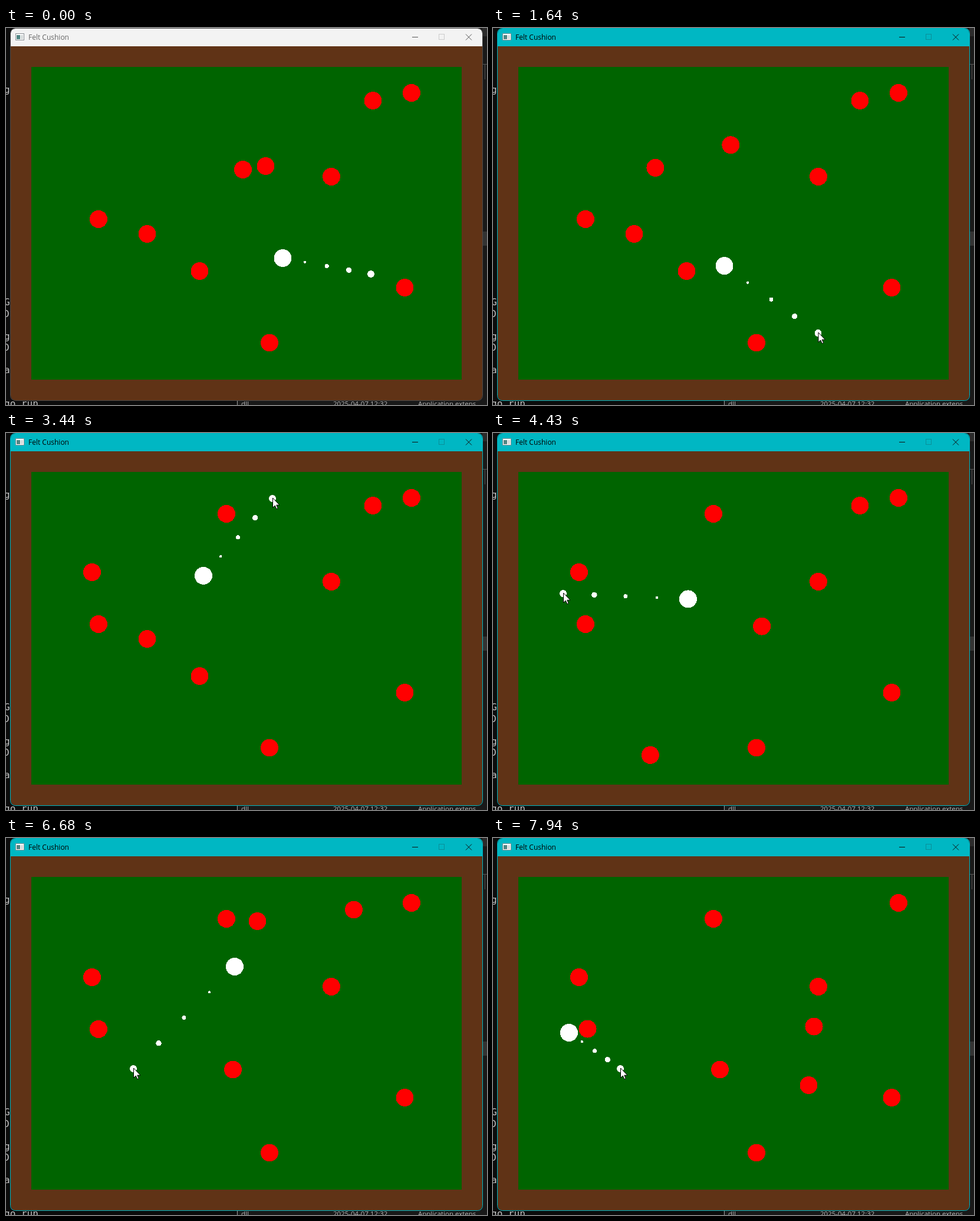
Animation of 816x639 px, one loop 8 s. Source, as an HTML page:

```html
<!DOCTYPE html>
<html lang="en">
<head>
<meta charset="utf-8">
<title>Felt Cushion</title>
<style>
  html, body { margin: 0; width: 100%; height: 100%; overflow: hidden; background: #0c0c0c; }
  svg { display: block; width: 816px; height: 639px; }
  .term { font: 16px "DejaVu Sans Mono", monospace; fill: #c4c4c4; }
  .list { font: 11.5px "Open Sans", sans-serif; fill: #b8b8b8; }
  .title { font: 12px "Open Sans", sans-serif; fill: #666; }
  .bar { fill: #f3f3f3; }
  .edge { fill: none; stroke: #4a4a4a; }
  .btn { fill: none; stroke: #555; }
  .off { fill: none; stroke: #ccc; }
  .active .title { fill: #000; }
  .active .bar { fill: #00b7c3; }
  .active .edge { stroke: #00b7c3; }
  .active .btn { stroke: #111; }
  .active .off { stroke: #0a8f99; }
  #cursor { visibility: hidden; }
  .active #cursor { visibility: visible; }
  #balls { shape-rendering: crispEdges; }
</style>
</head>
<body>
<svg id="stage" viewBox="0 0 816 639">
  <rect width="816" height="639" fill="#0c0c0c"/>
  <rect x="391" width="425" height="639" fill="#191919"/>
  <rect x="808" width="8" height="14" fill="#2b2b2b"/>
  <rect x="808" y="345" width="8" height="24" fill="#333"/>
  <path d="M808 61.5h8M812.5 62v25" stroke="#555"/>
  <path d="M392.5 631v8" stroke="#999"/>
  <g class="term">
    <text x="-3" y="110">g</text>
    <text x="-3" y="470">G</text>
    <text x="-4" y="490">D</text>
    <text x="-3" y="528">g</text>
    <text x="-4" y="547">D</text>
    <text x="-3" y="585">a</text>
    <text x="-3" y="642">go run</text>
  </g>
  <g class="list">
    <text x="396" y="641">.dll</text>
    <text x="555" y="641">2025-04-07 12:32</text>
    <text x="699" y="641">Application extens</text>
  </g>

  <rect class="bar" x="8" y="1" width="800" height="60" rx="8"/>
  <path d="M8 31h800v592a8 8 0 0 1-8 8H16a8 8 0 0 1-8-8z" fill="#603316"/>
  <rect class="edge" x="7.5" y=".5" width="801" height="631" rx="8"/>
  <rect x="43" y="66" width="730" height="530" fill="#006400"/>
  <rect x="16.5" y="9.5" width="14" height="11" fill="#fff" stroke="#8a8f94"/>
  <rect x="18" y="12" width="6" height="7" fill="#4f8583"/>
  <rect x="25" y="12" width="4" height="7" fill="#d5dada"/>
  <text class="title" x="38" y="20">Felt Cushion</text>
  <path class="btn" d="M689 15.5h10M780 10.5l10 10M790 10.5l-10 10"/>
  <rect class="off" x="734.5" y="10.5" width="9" height="9"/>

  <g id="balls"></g>
  <path id="cursor" d="M.5 0V16.5L4.3 13 6.8 18.7 9.2 17.6 6.8 12.1H12z" fill="#fff" stroke="#000"/>
</svg>
<script>
const LOOP = 8000, START = 560, STEP = 90;
const LEFT = 58, RIGHT = 758, TOP = 81, BOTTOM = 581;

// Reflects a straight course back between two cushions.
function fold(v, lo, hi) {
  const w = hi - lo, m = (((v - lo) % (2 * w)) + 2 * w) % (2 * w);
  return lo + Math.min(m, 2 * w - m);
}

// A run of straight rolls. Targets beyond a cushion mean a bounce.
class Course {
  constructor(x, y) {
    this.x = x;
    this.y = y;
    this.end = 0;
    this.legs = [];
  }
  wait(t) {
    this.end = t;
    return this;
  }
  // k: final speed over first speed
  to(t, x, y, k = 1) {
    this.legs.push({ a: this.end, b: t, k, x: this.x, y: this.y, dx: x - this.x, dy: y - this.y });
    this.x = fold(x, LEFT, RIGHT);
    this.y = fold(y, TOP, BOTTOM);
    this.end = t;
    return this;
  }
  at(t) {
    const leg = this.legs.findLast(l => t >= l.a) || this.legs[0];
    if (!leg) return [this.x, this.y];
    const u = Math.min(1, Math.max(0, (t - leg.a) / (leg.b - leg.a)));
    const p = u * (2 - (1 - leg.k) * u) / (1 + leg.k);
    return [fold(leg.x + leg.dx * p, LEFT, RIGHT), fold(leg.y + leg.dy * p, TOP, BOTTOM)];
  }
}
const from = (x, y) => new Course(x, y);

const cue = from(469.5, 390)
  .wait(740).to(830, 441, 264).to(920, 423, 260)
  .wait(1060).to(2062, 381, 948, .25)
  .to(2360, 362.5, 193, .6).to(3300, 335, 242, 0)
  .wait(3480).to(3565, 259, 327)
  .to(5330, 374, 254, .3).to(6140, 388, 218, 0)
  .wait(6680).to(6725, 420, 172).to(6815, 569, 139)
  .to(7940, 1529, 832, .7);

const mouse = from(619, 417)
  .wait(560).to(740, 506, 559)
  .wait(1370).to(1750, 570, 500).to(2090, 486, 299).to(2340, 473, 123, .5)
  .wait(2990).to(3300, 452, 111)
  .wait(3800).to(4500, 82, 290).to(5000, 113, 282)
  .wait(5500).to(6140, 132, 350).to(6500, 216, 391);

const reds = [
  from(552, 252), from(676.5, 440), from(447, 533.5), from(688, 110),
  from(402, 240)
    .wait(890).to(920, 400, 238)
    .wait(1060).to(2360, 178.5, 236, .36).to(3080, 146, 236, 0),
  from(440.5, 234)
    .wait(830).to(920, 438.5, 116).to(1060, 436, -69, .9)
    .to(2062, 390, 185, .3).to(2360, 381, 106, .5).to(3100, 374, 25, 0),
  from(157, 324).wait(7900).to(7940, 160.5, 323.5),
  from(239.5, 349)
    .wait(3565).to(3815, 31, 581).to(4100, 312, 390, .7)
    .to(5330, 809, 175, .8).to(5500, 648, 140).to(6600, 590, 121.5, 0)
    .wait(6815).to(7940, 971.5, -680.5, .4),
  from(328.5, 412)
    .wait(4060).to(4250, 240, 581, .7).to(5330, 359, 426, .4).to(6140, 385, 392.5, 0),
  from(622.5, 123)
    .wait(5500).to(6600, 426.5, 21, .1)
    .wait(6725).to(7940, 535.5, -581, .25)
];

const stage = document.getElementById("stage");
const layer = document.getElementById("balls");
const cursor = document.getElementById("cursor");

function circle(r, fill) {
  const c = document.createElementNS("http://www.w3.org/2000/svg", "circle");
  c.setAttribute("r", r);
  c.setAttribute("fill", fill);
  return layer.appendChild(c);
}
function place(c, [x, y]) {
  c.setAttribute("cx", x);
  c.setAttribute("cy", y);
}

const redDots = reds.map(() => circle(15, "#f00"));
const cueDot = circle(15, "#fff");
const aimDots = [2.2, 3.5, 4.7, 6].map(r => circle(r, "#fff"));

function draw(t) {
  const s = t < START ? 0 : START + Math.floor((t - START) / STEP) * STEP;
  const c = cue.at(s), m = mouse.at(s);
  stage.classList.toggle("active", s >= START);
  reds.forEach((red, i) => place(redDots[i], red.at(s)));
  place(cueDot, c);
  aimDots.forEach((dot, i) => {
    const f = (i + 1) / 4;
    place(dot, [c[0] + (m[0] - c[0]) * f, c[1] + (m[1] - c[1]) * f]);
  });
  cursor.setAttribute("transform", `translate(${m[0]} ${m[1] - 1})`);
}

const begin = performance.now();
function tick() {
  draw((performance.now() - begin) % LOOP);
  requestAnimationFrame(tick);
}
tick();
</script>
</body>
</html>
```
